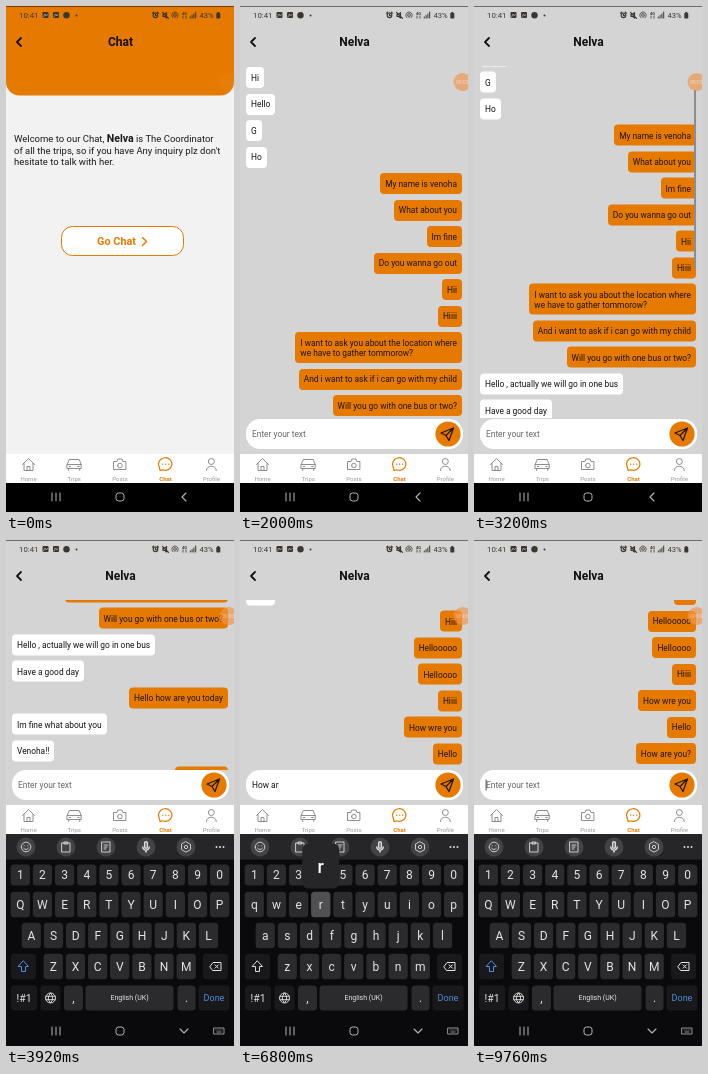
An HTML page that plays this animation: 228x506 px, repeating every 9.84 s.

```html
<!DOCTYPE html>
<html lang="en">
<head>
<meta charset="utf-8">
<title>Chat</title>
<style>
html, body { margin: 0; width: 100%; height: 100%; overflow: hidden; background: #000; }
body, svg text { font-family: Roboto, sans-serif; }
#stage { position: relative; width: 228px; height: 506px; overflow: hidden; }
#stage > div, #stage > svg, #chat > * { position: absolute; left: 0; top: 0; }
svg { display: block; overflow: visible; }
#welcome, #chat { width: 228px; height: 476px; background: #f2f2f2; }
#chat { background: #d4d4d4; }
#view { top: 60px !important; width: 228px; overflow: hidden; }
#list { position: absolute; left: 6px; width: 216px; top: 1px; display: flex; flex-direction: column; align-items: flex-start; gap: 5.5px; }
#list p { margin: 0; padding: 5.5px 5px; font-size: 8.4px; line-height: 10px; white-space: pre; border-radius: 4px; background: #fff; color: #111; }
#list p.me { align-self: flex-end; background: #e67a00; color: #1c1204; }
#bar { left: 219.5px !important; width: 2.5px; background: #8d8d8d; }
#edge { width: 228px; height: 1px; background: rgba(0, 0, 0, .5); }
</style>
</head>
<body>
<div id="stage">
  <div id="welcome"></div>
  <div id="chat">
    <svg id="title" width="228" height="60"></svg>
    <div id="view"><div id="list"></div></div>
    <div id="bar"></div>
  </div>
  <svg id="input" width="228" height="32"></svg>
  <svg id="status" width="228" height="20"></svg>
  <svg id="bubble" width="228" height="100"></svg>
  <svg id="tabs" width="228" height="30"></svg>
  <svg id="board" width="228" height="184"></svg>
  <svg id="nav" width="228" height="30"></svg>
  <div id="edge"></div>
</div>
<script>
const LOOP = 9840, STEP = 80, ORANGE = '#e67a00';
const $ = id => document.getElementById(id);

const text = (x, y, s, size, fill, extra = '') =>
  `<text x="${x}" y="${y}" font-size="${size}" fill="${fill}" ${extra}>${s.replace(/&/g, '&amp;').replace(/</g, '&lt;')}</text>`;
const mid = (x, y, s, size, fill, extra = '') =>
  text(x, y + size * .355, s, size, fill, 'text-anchor="middle" ' + extra);
const rect = (x, y, w, h, r, fill, extra = '') =>
  `<rect x="${x}" y="${y}" width="${w}" height="${h}" rx="${r}" fill="${fill}" ${extra}/>`;
const dot = (x, y, r, fill) => `<circle cx="${x}" cy="${y}" r="${r}" fill="${fill}"/>`;
// Stroked icon centred on x, y
const icon = (x, y, d, color, w = 1) =>
  `<path transform="translate(${x} ${y})" d="${d}" fill="none" stroke="${color}" stroke-width="${w}" stroke-linecap="round" stroke-linejoin="round"/>`;
const ring = r => `M${-r} 0a${r} ${r} 0 1 1 ${2 * r} 0a${r} ${r} 0 1 1 ${-2 * r} 0`;
const BOLD = 'font-weight="700"';
const BACK = 'M2-4L-2 0L2 4';

// Screens
const header = name => icon(13, 36, BACK, '#111', 1.8) + mid(114.5, 36, name, 12, '#111', BOLD);

$('welcome').innerHTML = `<svg width="228" height="476">
  <path d="M0 0H228V76a13.5 13.5 0 0 1-13.5 13.5H13.5a13.5 13.5 0 0 1-13.5-13.5Z" fill="${ORANGE}"/>
  ${header('Chat')}
  <text x="8" y="136.3" font-size="9.5" fill="#1a1a1a">Welcome to our Chat, <tspan ${BOLD} font-size="10.6">Nelva</tspan> is The Coordinator</text>
  ${text(8, 147.6, "of all the trips, so if you have Any inquiry plz don't", 9.5, '#1a1a1a')}
  ${text(8, 158.9, 'hesitate to talk with her.', 9.5, '#1a1a1a')}
  <g id="go">${rect(55.5, 220.5, 122, 29, 11, '#fff', `stroke="${ORANGE}"`)}
  ${mid(110.5, 235.5, 'Go Chat', 10.9, ORANGE, BOLD)}
  ${icon(138.5, 235.5, 'M-2-4L2 0L-2 4', ORANGE, 1.5)}</g></svg>`;
$('title').innerHTML = header('Nelva');

// Leading ">" marks an outgoing message
const messages = ['Hi', 'Hello', 'G', 'Ho', '>My name is venoha', '>What about you', '>Im fine',
  '>Do you wanna go out', '>Hii', '>Hiiii',
  '>I want to ask you about the location where\nwe have to gather tommorow?',
  '>And i want to ask if i can go with my child', '>Will you go with one bus or two?',
  'Hello , actually we will go in one bus', 'Have a good day', '>Hello how are you today',
  'Im fine what about you', 'Venoha!!', '>Yes im here', 'Hello', '>Hiii', '>Hellooooo',
  '>Helloooo', '>Hiiii', '>How wre you', '>Hello', '>How are you?'];
for (const m of messages) {
  const p = document.createElement('p');
  p.textContent = m.replace('>', '');
  if (m[0] === '>') p.className = 'me';
  $('list').append(p);
}

// System bars
const INK = '#3a3631';
$('status').innerHTML = text(13, 12, '10:41', 7.8, INK) +
  [39.5, 50].map(x => rect(x - 3, 6, 6, 6, 1, INK) + icon(x, 9, 'M-2 2L-.5-1L.8 1L2-.5', '#bbb', .7)).join('') +
  dot(60.5, 9.2, 3.2, INK) + dot(70.5, 9.5, 1, INK) +
  icon(149.5, 9.3, ring(2.3) + 'M0-1V.3H1M-3-2.2L-1.8-3.2M3-2.2L1.8-3.2', INK, 1.2) +
  icon(159.5, 9.3, 'M-2.5-1H-1L1-2.7V2.7L-1 1H-2.5ZM-3-3L3 3', INK, 1.2) +
  icon(169, 9.3, 'M-2 2.5A3.2 3.2 0 1 1 2 2.5M-1 1A1.5 1.5 0 1 1 1 1M0 0V2', INK, .8) +
  mid(178.5, 7.5, '4G', 4, INK, BOLD) + icon(178.5, 11, 'M-1.5-1V1.2M1.5 1.2V-1', INK, .8) +
  icon(187, 12, 'M-2.7 0V-1M-.9 0V-2.5M.9 0V-4M2.7 0V-6', INK, 1) +
  text(193.5, 12, '43%', 7.6, INK) + rect(210.3, 7, 4, 5.6, .8, INK) + rect(211.3, 6, 2, 1, 0, INK);

const tabs = [
  ['Home', 'M-6-0L0-6L6 0M-4.5-1V6H4.5V-1M-1.5 6V2H1.5V6'],
  ['Trips', 'M-7 0L-5-5H5L7 0V4H-7ZM-7 0H7M-5.5 4V6M5.5 4V6M-5 2H-3.5M3.5 2H5'],
  ['Posts', 'M-6-3H-3L-2-5.5H2L3-3H6V5H-6ZM-2.3 1a2.3 2.3 0 1 1 4.6 0a2.3 2.3 0 1 1-4.6 0'],
  ['Chat', 'M-5.5 6L-6.5 2A6.7 6.3 0 1 1-3 5.3ZM-3-.3H-2.8M0-.3H.2M3-.3H3.2'],
  ['Profile', 'M-3-3a3 3 0 1 1 6 0a3 3 0 1 1-6 0M-5 6C-5 .2 5 .2 5 6']
];
$('tabs').innerHTML = rect(0, 0, 228, 29, 0, '#fff') + tabs.map(([name, d], i) => {
  const x = 22.5 + 45.7 * i, on = name === 'Chat';
  return icon(x, 10.5, d, on ? ORANGE : '#808080', on ? 1.2 : .9) +
    mid(x, 25, name, 6, on ? ORANGE : '#999', on ? BOLD : '');
}).join('');

function nav(open) {
  const c = '#b5b5b5';
  return rect(0, 1, 228, 29, 0, open ? '#0a0a0c' : '#000') +
    icon(50, 15, 'M-4-4V4M0-4V4M4-4V4', c) + rect(110, 11, 8, 8, 2.6, 'none', `stroke="${c}"`) +
    icon(178, 15, open ? 'M-4-2L0 2L4-2' : 'M2-4L-2 0L2 4', c, 1.1) +
    (open ? icon(213, 15, 'M-5-3H5V3H-5ZM-3-1H-2.8M-1-1H-.8M1-1H1.2M3-1H3.2M-2 1H2', c, .8) : '');
}

function input(value, caret) {
  return rect(6, 0, 217, 30, 14, '#fff') +
    text(12, 18, value || 'Enter your text', 8.4, value ? '#111' : '#666') +
    (caret ? rect(11.7, 9.5, .8, 11, 0, '#222') : '') +
    dot(208, 15, 12.6, ORANGE) +
    icon(207.5, 15, 'M6-6L-6.5-1L-1.5 1.5L1.5 6.5ZM6-6L-1.5 1.5', '#22180a', 1.3);
}

// Keyboard, y measured from its top edge
const LAYOUT = {
  upper: ['QWERTYUIOP', 'ASDFGHJKL', 'ZXCVBNM'],
  lower: ['qwertyuiop', 'asdfghjkl', 'zxcvbnm'],
  sym: ['+×÷=/_<>[]', '!@#£%^&*()', '-\'":;,?']
};
const PITCH = 22.15, LIGHT = '#e4e4e4', KEY = '#2b2b2d', DIM = '#19191b';

function board(mode, pressed) {
  let out = rect(0, 1, 228, 183, 0, '#0a0a0c') + rect(0, 1, 228, 25.5, 0, '#262628'), pop = '';
  const key = (x, y, w, h, fill, s = '', size = 12, color = LIGHT) => {
    out += rect(x - w / 2, y - h / 2, w, h, 3.5, fill) + mid(x, y, s, size, color);
  };
  const tools = [
    ring(4.8) + 'M-2.4 1.2Q0 4 2.4 1.2M-1.8-1.3V-1.2M1.8-1.3V-1.2',
    'M-4-4H4V5H-4ZM-1.7-5H1.7V-3H-1.7Z',
    'M-4-5H4V5H-4ZM-2-2H2M-2 0H1M-2 2H0',
    'M-1.3-4V0A1.3 1.3 0 0 0 1.3 0V-4A1.3 1.3 0 0 0-1.3-4M-3.2 0A3.2 3.2 0 0 0 3.2 0M0 3.3V5',
    'M0-5.2L4.5-2.6V2.6L0 5.2L-4.5 2.6V-2.6Z' + ring(1.7)
  ];
  tools.forEach((d, i) => {
    const x = 20 + 40 * i;
    out += dot(x, 14, 9.5, '#434346') + icon(x, 14, d, '#ddd', i === 3 ? 1.5 : .9);
  });
  out += [210.5, 214, 217.5].map(x => dot(x, 14, 1, '#ddd')).join('');

  const row = (chars, x0, y, h) => [...chars].forEach((c, i) => {
    const x = x0 + PITCH * i, hit = c === pressed;
    key(x, y, 19.3, h, hit ? '#505053' : KEY, c);
    if (hit) pop = rect(x - 18.5, y - 61, 37, 45, 6, '#262628') + mid(x, y - 38, c, 18, '#fff', 'font-weight="500"');
  });
  const [a, b, c] = LAYOUT[mode], sym = mode === 'sym';
  row('1234567890', 14.3, 42, 21);
  row(a, 14.3, 71.5, 25.5);
  row(b, sym ? 14.3 : 25.3, 102.5, 25.5);
  row(c, 47.3, 133.5, 25.5);
  key(17.5, 133.5, 25, 25.5, DIM, sym ? '1/2' : '', 10.5);
  if (!sym) out += icon(17.5, 133.5, 'M0-5.5L5 0H2V5H-2V0H-5Z', mode === 'upper' ? '#4b8fe0' : '#ddd', 1);
  key(209.5, 133.5, 25, 25.5, DIM);
  out += icon(210, 133.5, 'M-6 0L-3-4H5V4H-3ZM-1-1.7L2.4 1.7M2.4-1.7L-1 1.7', LIGHT, 1);
  key(18, 165, 26, 25, DIM, sym ? 'ABC' : '!#1', 10.5);
  key(44.5, 165, 20, 25, DIM);
  out += icon(44.5, 165, ring(5) + 'M0-5Q-4.5 0 0 5Q4.5 0 0-5M-4.5-1.7H4.5M-4.5 1.7H4.5', LIGHT, .9);
  key(67.5, 165, 19, 25, KEY, ',');
  key(123.5, 165, 88, 25, KEY, 'English (UK)', 7);
  key(180.5, 165, 18, 25, KEY, '.');
  key(208, 165, 31, 25, DIM, 'Done', 9, '#4b8fe0');
  return out + pop;
}

// Timing
const SCROLL = [[2400, 0], [3120, 30], [3200, 48.5], [3280, 160], [3360, 270], [3440, 321.5],
  [5440, 321.5], [5600, 339], [5680, 357.5], [5760, 405], [5920, 485], [6160, 530.5],
  [8960, 530.5], [9120, 548], [9280, 557]];
const PHRASE = 'How are you';
const TYPE_AT = 6320, TYPE_STEP = 96;

function track(pts, t) {
  if (t <= pts[0][0]) return pts[0][1];
  for (let i = 1; i < pts.length; i++) {
    const [t0, a] = pts[i - 1], [t1, b] = pts[i];
    if (t < t1) return a + (b - a) * (t - t0) / (t1 - t0);
  }
  return pts[pts.length - 1][1];
}
const between = (t, a, b) => t >= a && t < b;
const ramp = (t, a, b) => Math.min(1, Math.max(0, (t - a) / (b - a)));
const place = (id, y) => $(id).style.transform = `translateY(${y}px)`;

const cache = {};
function fill(id, html) {
  if (cache[id] !== html) $(id).innerHTML = cache[id] = html;
}

function draw(t) {
  const enter = ramp(t, 1280, 1600);
  $('chat').style.opacity = enter;
  place('chat', 24 * (1 - enter) ** 2);
  $('go').style.opacity = between(t, 1040, 1120) ? .5 : 1;

  const open = t >= 3520, small = t >= 3600;
  const lift = small ? 183 : 0, height = small ? 170 : 352;
  $('view').style.height = height + 'px';
  $('list').style.visibility = t >= 2000 ? 'visible' : 'hidden';
  $('list').lastChild.style.display = t >= 8960 ? '' : 'none';

  const y = track(SCROLL, t), total = t >= 8960 ? 726 : 699;
  place('list', -y);
  const bar = $('bar').style;
  bar.opacity = between(t, 2480, 3520) || between(t, 5520, 6240) || between(t, 9040, 9360) ? 1 : 0;
  bar.height = height * height / total + 'px';
  bar.top = 60 + y * height / total + 'px';

  const n = t < TYPE_AT ? 0 : Math.min(PHRASE.length, 1 + Math.floor((t - TYPE_AT) / TYPE_STEP));
  const value = t >= 8560 ? '' : PHRASE.slice(0, n) + (t >= 8320 ? '?' : '');
  const typing = between(t, TYPE_AT, TYPE_AT + TYPE_STEP * PHRASE.length);
  const pressed = between(t, 8240, 8400) ? '?' : typing ? PHRASE[n - 1] : '';
  const mode = between(t, 7680, 8560) ? 'sym' : between(t, 6400, 7680) ? 'lower' : 'upper';

  fill('input', input(value, between(t, 4080, 4560) || t >= 9440));
  $('input').style.opacity = enter;
  place('input', 413 - lift);
  place('tabs', 448 - lift);
  fill('board', board(mode, pressed));
  $('board').style.visibility = open ? 'visible' : 'hidden';
  place('board', 293 + 183 * (1 - ramp(t, 3440, 3760)));
  fill('nav', nav(open));
  place('nav', 476);

  const sec = String(Math.floor(t / 1000)).padStart(2, '0');
  fill('bubble', dot(222.5, 76, 9, '#f0954a') + text(216, 78, '00:' + sec, 5, '#fff', 'opacity=".7"'));
  $('bubble').style.opacity = .1 + .55 * enter;
}

const start = performance.now();
function tick() {
  const t = (performance.now() - start) % LOOP;
  draw(Math.floor(t / STEP) * STEP);
  requestAnimationFrame(tick);
}
tick();
</script>
</body>
</html>
```
